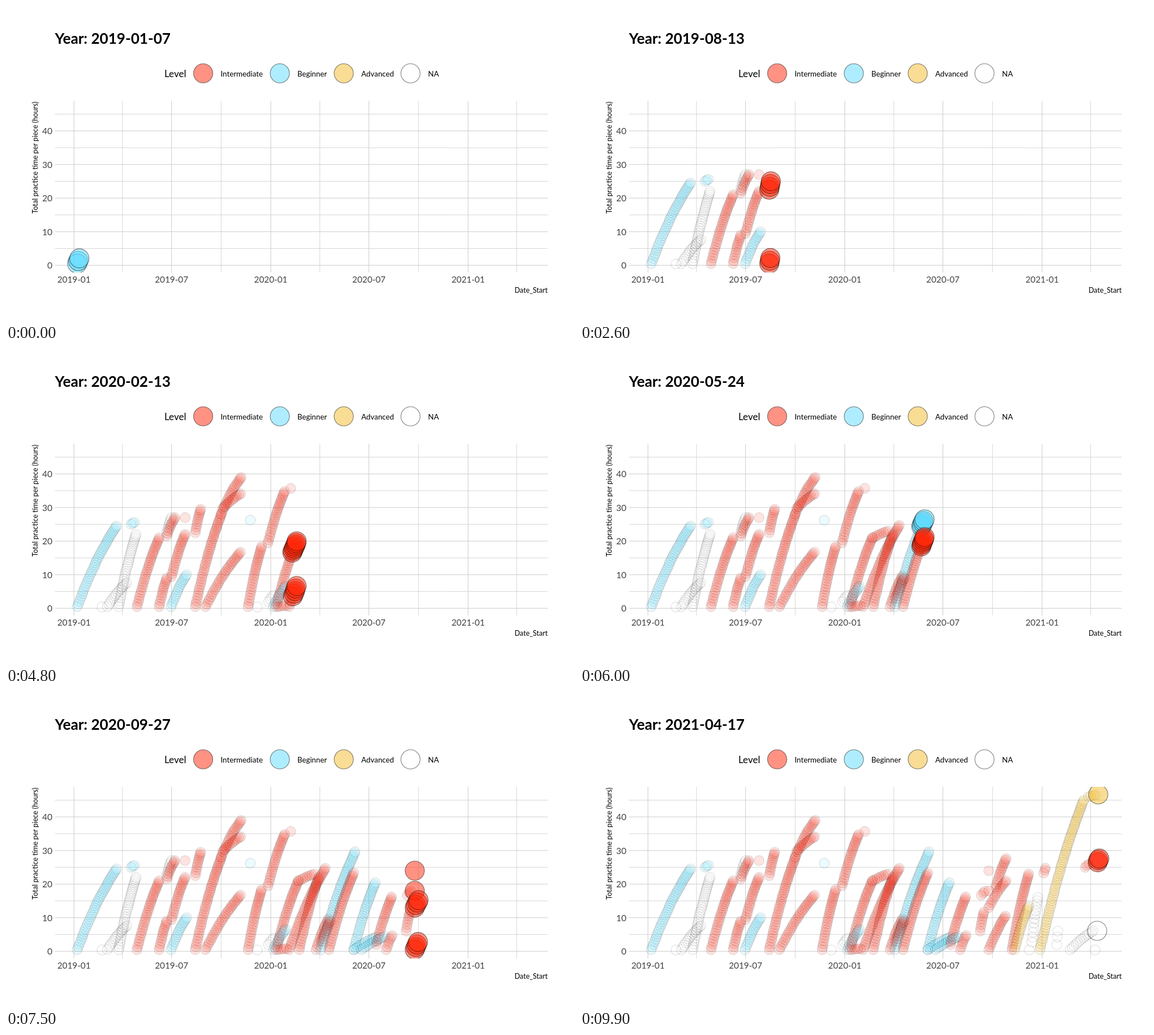
Write an HTML page with a canvas that moves like this. It is 1004 px wide and 558 px high and loops after 10000 ms.

```html
<!DOCTYPE html>
<html lang="en">
<head>
<meta charset="utf-8">
<title>Practice time</title>
<style>
  html, body { margin: 0; width: 100%; height: 100%; overflow: hidden; background: #fff; }
  canvas { display: block; }
</style>
</head>
<body>
<canvas id="stage" width="1004" height="558"></canvas>
<script>
const ctx = document.getElementById('stage').getContext('2d');
const FRAMES = 100, FRAME_MS = 100;
const FIRST_DAY = 6, DAYS_PER_FRAME = 831 / 99; // days count from 2019-01-01
const PANEL = { left: 86.5, right: 957.5, top: 168, bottom: 472 };
const RED = '#ff2609', BLUE = '#5fdbff', GOLD = '#f4bc2c', NONE = null;
const DOT_GAP = 4.2;

const dayToX = day => 120.1 + day * 0.9532;
const hoursToY = hours => 459.3 - hours * 5.95;

const dots = [];

function dot(color, day, hours) {
  const frame = Math.round((day - FIRST_DAY) / DAYS_PER_FRAME);
  dots.push({ color, day, frame, x: dayToX(day), y: hoursToY(hours) });
}

// A piece is practised from its first day at a pace in hours per day that slackens slightly.
function piece(color, start, to, from = 0.5, pace = 0.5) {
  const days = (to - from) / pace;
  const length = Math.hypot(dayToX(days) - dayToX(0), hoursToY(to) - hoursToY(from));
  const steps = Math.max(1, Math.round(Math.min(days, length / DOT_GAP)));
  for (let i = 0; i <= steps; i++) {
    const u = i / steps;
    const progress = u + 0.07 * Math.sin(Math.PI * u);
    dot(color, Math.round(start + days * u), from + (to - from) * progress);
  }
}

piece(BLUE, 6, 24.5, 0.5, 0.33);
piece(BLUE, 106, 25.6, 25, 0.1);
piece(BLUE, 180, 10, 0.5, 0.33);
dot(BLUE, 327, 26.2);
piece(BLUE, 370, 6.5, 0.5, 0.27);
piece(BLUE, 458, 29.6, 0.5, 0.46);
piece(BLUE, 519, 20.4);
piece(BLUE, 519, 4.2, 0.5, 0.09);
piece(BLUE, 533, 4.4, 0.5, 0.09);

for (const day of [52, 340, 707, 829]) dot(NONE, day, 0.4);
piece(NONE, 62, 7.6, 0.5, 0.2);
piece(NONE, 83, 22, 0.5, 0.67);
piece(NONE, 172, 27, 22.5);
piece(NONE, 361, 3.8, 2, 0.2);
piece(NONE, 712, 16, 2.7, 1.2);
piece(NONE, 758, 6, 2, 2);
piece(NONE, 783, 6, 0.5, 0.13);
dot(NONE, 833, 6.1);

piece(RED, 117, 21);
piece(RED, 158, 9, 0.5, 0.6);
piece(RED, 172, 27, 21.5, 0.36);
piece(RED, 181, 22, 9.5);
dot(RED, 206, 27);
piece(RED, 225, 28, 0.5, 0.57);
piece(RED, 225, 29.5, 22.5, 0.7);
piece(RED, 244, 16.7, 0.5, 0.25);
piece(RED, 273, 39, 28, 0.3);
piece(RED, 276, 34.1, 29.8, 0.13);
piece(RED, 323, 18.4, 0.5, 0.72);
piece(RED, 360, 34.8, 19.5);
piece(RED, 375, 21);
piece(RED, 379, 0.8, 0.5, 0.02);
piece(RED, 399, 24.7, 0.5, 0.36);
dot(RED, 402, 35.7);
piece(RED, 417, 23, 21, 0.07);
piece(RED, 418, 22, 0.5, 0.6);
piece(RED, 449, 9.6, 0.5, 0.4);
piece(RED, 459, 9, 3, 0.35);
piece(RED, 473, 23.3);
piece(RED, 561, 16.2, 2);
piece(RED, 579, 4.7, 0.5, 0.4);
piece(RED, 616, 11.7, 6, 0.8);
piece(RED, 618, 17.9, 16.7, 0.17);
for (const hours of [18, 24]) dot(RED, 632, hours);
piece(RED, 632, 10.5, 0.5, 0.32);
piece(RED, 632, 21, 13, 0.25);
piece(RED, 645, 27.6, 19, 0.45);
piece(RED, 675, 23, 0.5, 0.73);
piece(RED, 734, 24.8, 23.3);
piece(RED, 811, 26, 25, 0.15);
piece(RED, 834, 27.6, 26.5, 0.4);

piece(GOLD, 680, 13.3);
piece(GOLD, 727, 45, 0.5, 0.55);
piece(GOLD, 817, 46.7, 46, 0.04);

dots.sort((a, b) => a.day - b.day);
const byFrame = Array.from({ length: FRAMES }, (_, n) => dots.filter(d => d.frame === n));

// Frames without any dot blend the neighbouring sets, level by level, highest dots first.
function activeDots(frame) {
  if (byFrame[frame].length) return byFrame[frame];
  let before = frame, after = frame;
  while (!byFrame[before].length) before--;
  while (!byFrame[after].length) after++;
  const k = (frame - before) / (after - before);
  return [RED, BLUE, GOLD, NONE].flatMap(color => {
    const from = byFrame[before].filter(d => d.color === color).sort((a, b) => a.y - b.y);
    const to = byFrame[after].filter(d => d.color === color);
    return from.map((a, i) => {
      const b = to[i] || a;
      return { color, x: a.x + (b.x - a.x) * k, y: a.y + (b.y - a.y) * k };
    });
  });
}

function circle({ x, y, color }, radius, alpha) {
  ctx.globalAlpha = alpha;
  ctx.beginPath();
  ctx.arc(x, y, radius, 0, 2 * Math.PI);
  if (color) {
    ctx.fillStyle = color;
    ctx.fill();
  }
  ctx.strokeStyle = '#000';
  ctx.lineWidth = 1.1;
  ctx.stroke();
  ctx.globalAlpha = 1;
}

function text(string, x, y, size, align = 'left', color = '#000', weight = 400) {
  ctx.font = `${weight} ${size}px Lato, sans-serif`;
  ctx.textAlign = align;
  ctx.fillStyle = color;
  ctx.fillText(string, x, y);
}

function line(x0, y0, x1, y1, width) {
  ctx.strokeStyle = '#cccccc';
  ctx.lineWidth = width;
  ctx.beginPath();
  ctx.moveTo(x0, y0);
  ctx.lineTo(x1, y1);
  ctx.stroke();
}

function drawAxes() {
  for (let hours = 0; hours <= 45; hours += 5) {
    const y = hoursToY(hours), major = hours % 10 === 0;
    line(PANEL.left, y, PANEL.right, y, major ? 1 : 0.8);
    if (major) text(hours, 82, y + 6, 15.5, 'right', '#404040');
  }
  for (let quarter = 0; quarter < 10; quarter++) {
    const date = new Date(Date.UTC(2019, quarter * 3, 1));
    const x = dayToX((date - Date.UTC(2019, 0, 1)) / 864e5), major = quarter % 2 === 0;
    line(x, PANEL.top, x, PANEL.bottom, major ? 1 : 0.8);
    if (major) text(date.toISOString().slice(0, 7), x, 490, 15.3, 'center', '#404040');
  }
  text('Date_Start', 957.5, 508, 12.5, 'right');
  ctx.save();
  ctx.translate(56, 268.5);
  ctx.rotate(-Math.PI / 2);
  text('Total practice time per piece (hours)', 0, 0, 12.7, 'center');
  ctx.restore();
}

function drawLegend() {
  const entries = [['Intermediate', RED, 348.5], ['Beginner', BLUE, 484], ['Advanced', GOLD, 597], ['NA', NONE, 715]];
  text('Level', 280, 126, 17);
  for (const [label, color, x] of entries) {
    circle({ x, y: 119.3, color }, 17, 0.5);
    text(label, x + 31, 124.5, 13.3);
  }
}

function draw(frame) {
  ctx.fillStyle = '#fff';
  ctx.fillRect(0, 0, 1004, 558);
  const day = Math.floor(FIRST_DAY + frame * DAYS_PER_FRAME + 1e-6);
  const date = new Date(Date.UTC(2019, 0, 1 + day)).toISOString().slice(0, 10);
  text('Year: ' + date, 86.5, 66.5, 26.1, 'left', '#000', 700);
  drawLegend();
  drawAxes();
  ctx.save();
  ctx.beginPath();
  ctx.rect(PANEL.left, PANEL.top, PANEL.right - PANEL.left, PANEL.bottom - PANEL.top);
  ctx.clip();
  for (const past of dots) if (past.frame < frame) circle(past, 8.8, 0.125);
  for (const active of activeDots(frame)) circle(active, 17, 0.5);
  ctx.restore();
}

let shown = -1;
function tick() {
  const frame = Math.floor(performance.now() / FRAME_MS) % FRAMES;
  if (frame !== shown) draw(shown = frame);
  requestAnimationFrame(tick);
}
tick();
</script>
</body>
</html>
```
